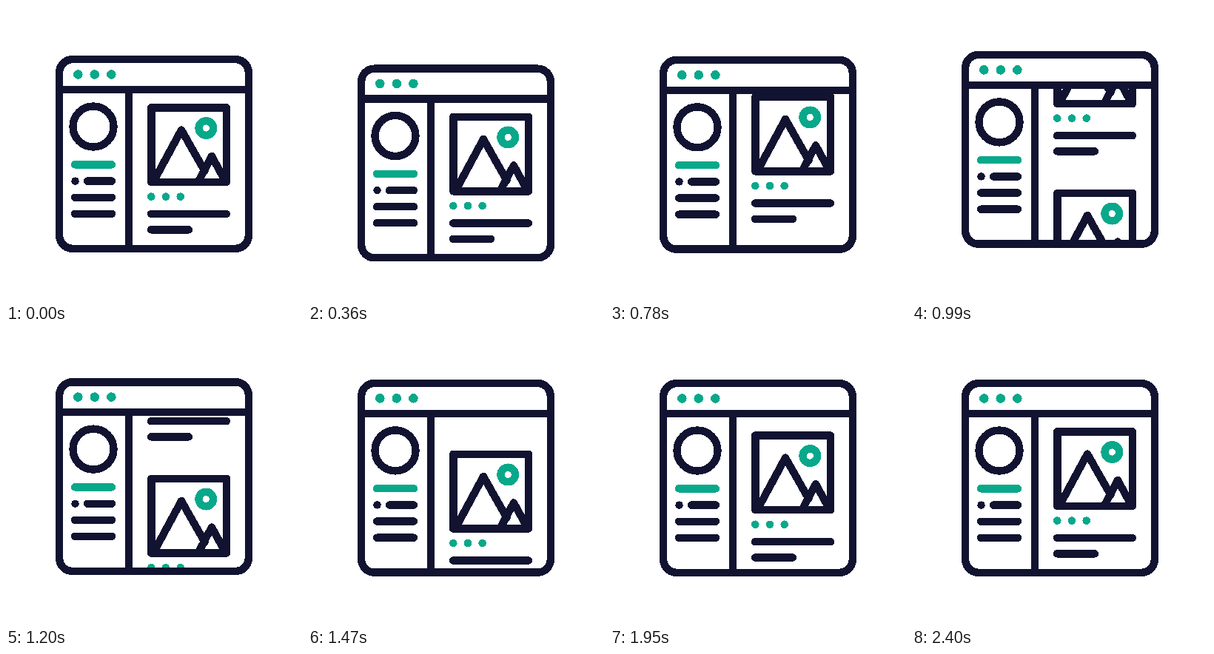
An HTML page for the animation above (4430 ms loop, 400 by 400 pixels).

```html
<!DOCTYPE html>
<html>
<head>
<meta charset="utf-8">
<style>
html, body { margin: 0; height: 100%; overflow: hidden; background: #fff; }
svg { display: block; width: 100%; height: 100%; shape-rendering: crispEdges; }
.line { fill: none; stroke: #121331; stroke-width: 10.4; stroke-linecap: round; stroke-linejoin: round; }
.flat { stroke-linecap: butt; }
.teal { stroke: #08a88a; }
.dots { fill: #08a88a; }
</style>
</head>
<body>
<svg viewBox="0 0 400 400">
  <defs>
    <clipPath id="pane"><rect x="166" y="113" width="162" height="215"/></clipPath>
    <g id="post">
      <g class="line">
        <path d="M196.3 137.3H298V238H196.3ZM200 236L237 167.5L268.5 223M260 237L278 203L296 236"/>
        <path d="M196 281H298M196 302.3H247"/>
        <circle class="teal" cx="270.3" cy="165" r="9.8"/>
      </g>
      <g class="dots">
        <circle cx="196.3" cy="257.6" r="5.3"/>
        <circle cx="216" cy="257.6" r="5.3"/>
        <circle cx="235.7" cy="257.6" r="5.3"/>
      </g>
    </g>
  </defs>
  <g id="win">
    <g clip-path="url(#pane)">
      <g id="feed">
        <use href="#post"/>
        <use href="#post" y="221.5"/>
      </g>
    </g>
    <g class="line">
      <rect x="72.2" y="72.2" width="255.6" height="255.6" rx="17.5"/>
      <path class="flat" d="M72 113H328M166 113V328"/>
      <circle cx="118" cy="163" r="27.5"/>
      <path class="teal" d="M93 214.3H143"/>
      <path d="M93.5 236.6h.01M110 236.6H143M93 258.7H143M93 280.8H143"/>
    </g>
    <g class="dots">
      <circle cx="97.3" cy="92.5" r="6.3"/>
      <circle cx="119.8" cy="92.5" r="6.3"/>
      <circle cx="142.4" cy="92.5" r="6.3"/>
    </g>
  </g>
</svg>
<script>
const LOOP = 4430, STEP = 30, PERIOD = 221.5;
const win = document.getElementById('win'), feed = document.getElementById('feed');

// cubic-bezier(a, 0, b, 1) evaluated at u
function ease(u, a, b) {
  if (u <= 0) return 0;
  if (u >= 1) return 1;
  let lo = 0, hi = 1, s;
  for (let i = 0; i < 30; i++) {
    s = (lo + hi) / 2;
    const r = 1 - s;
    if (3 * a * s * r * r + 3 * b * s * s * r + s ** 3 < u) lo = s; else hi = s;
  }
  return s * s * (3 - 2 * s);
}

const move = (t, start, end, dist, a, b) => dist * ease((t - start) / (end - start), a, b);

function draw(now) {
  const t = Math.floor(now % LOOP / STEP) * STEP;
  const bob = move(t, 0, 450, 13, .33, .4)
    + move(t, 450, 965, -19.2, .6, .6)
    + move(t, 965, 1600, 6.2, .2, .15);
  const scroll = move(t, 595, 2375, -PERIOD, .291, .012);
  win.setAttribute('transform', `translate(0 ${bob})`);
  feed.setAttribute('transform', `translate(0 ${scroll})`);
}

const begin = performance.now();
function tick() {
  draw(performance.now() - begin);
  requestAnimationFrame(tick);
}
tick();
</script>
</body>
</html>
```
